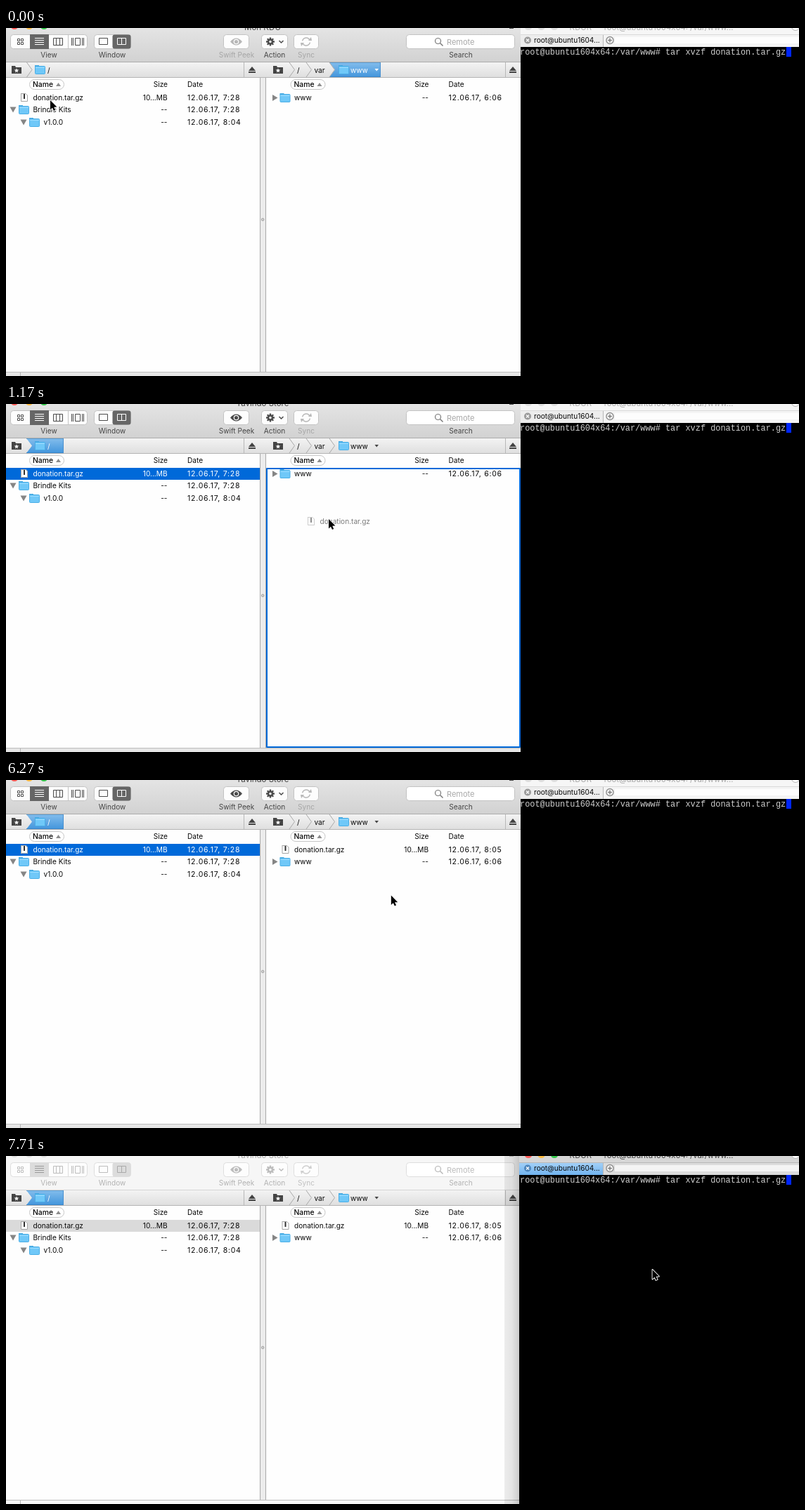
Write an HTML page with a canvas that moves like this. It is 1128 px wide and 496 px high and loops after 8 s.

```html
<!DOCTYPE html>
<html lang="en">
<head>
<meta charset="utf-8">
<title>File transfer</title>
<style>
html, body { margin: 0; width: 100%; height: 100%; overflow: hidden; background: #fff; }
canvas { display: block; }
</style>
</head>
<body>
<canvas id="stage" width="1128" height="496"></canvas>
<script>
const ctx = document.getElementById('stage').getContext('2d');
const LOOP = 8000;
const SANS = 'Inter, "Open Sans", sans-serif';
const MONO = '"Liberation Mono", "DejaVu Sans Mono", monospace';
const BLUE = '#0069d9', GRAY = '#dadada', INK = '#080808';

function rect(x, y, w, h, fill) {
  ctx.fillStyle = fill;
  ctx.fillRect(x, y, w, h);
}
function round(x, y, w, h, r, fill, stroke) {
  ctx.beginPath();
  ctx.roundRect(x + .5, y + .5, w - 1, h - 1, r);
  if (fill) { ctx.fillStyle = fill; ctx.fill(); }
  if (stroke) { ctx.strokeStyle = stroke; ctx.lineWidth = 1; ctx.stroke(); }
}
function trace(pts) {
  ctx.beginPath();
  for (let i = 0; i < pts.length; i += 2) ctx.lineTo(pts[i], pts[i + 1]);
}
function poly(pts, fill) {
  trace(pts);
  ctx.closePath();
  ctx.fillStyle = fill;
  ctx.fill();
}
function line(pts, color, width = 1) {
  trace(pts);
  ctx.strokeStyle = color;
  ctx.lineWidth = width;
  ctx.stroke();
}
function disc(x, y, r, fill, stroke, width = 1) {
  ctx.beginPath();
  ctx.arc(x, y, r, 0, 7);
  if (fill) { ctx.fillStyle = fill; ctx.fill(); }
  if (stroke) { ctx.strokeStyle = stroke; ctx.lineWidth = width; ctx.stroke(); }
}
function fade(y0, y1, top, bottom) {
  const g = ctx.createLinearGradient(0, y0, 0, y1);
  g.addColorStop(0, top);
  g.addColorStop(1, bottom);
  return g;
}
function text(s, x, y, color = INK, o = {}) {
  ctx.font = `${o.weight || 400} ${o.size || 10.1}px ${o.font || SANS}`;
  ctx.letterSpacing = (o.gap || 0) + 'px';
  ctx.textAlign = o.align || 'left';
  ctx.fillStyle = color;
  ctx.fillText(s, x, y);
}

function folder(x, y) {
  rect(x, y, 6, 3, '#45a9e2');
  round(x, y + 1, 15, 12, 1, '#70c8f8', '#4aaee6');
  rect(x + 1, y + 3, 13, 1, '#9bdcff');
}
function doc(x, y) {
  poly([x, y, x + 7, y, x + 10, y + 3, x + 10, y + 12, x, y + 12], '#fff');
  line([x + .5, y + .5, x + 7, y + .5, x + 9.5, y + 3, x + 9.5, y + 11.5, x + .5, y + 11.5, x + .5, y], '#a5a5a5');
  rect(x + 4, y + 1, 2, 7, '#333');
}
function eject(x) {
  poly([x - 5, 61, x, 55, x + 5, 61], '#444');
  rect(x - 5, 62, 10, 2, '#444');
}
function favorite(x) {
  poly([x, 54, x + 5, 54, x + 6, 56, x + 14, 56, x + 14, 65, x, 65], '#444');
  const pts = [];
  for (let i = 0; i < 10; i++) {
    const a = i * Math.PI / 5 - Math.PI / 2, r = i % 2 ? 1.5 : 3.5;
    pts.push(x + 7 + r * Math.cos(a), 60.7 + r * Math.sin(a));
  }
  poly(pts, '#fff');
}
function chevron(x) {
  line([x, 49, x + 7.5, 59.5, x, 70], '#a9a9a9');
}
function blueTab(x0, x1) {
  poly([x0, 49, x1, 49, x1, 70, x0, 70, x0 + 8, 59.5], fade(49, 70, '#83bdec', '#4295dc'));
  rect(x0, 49, x1 - x0, 1, '#5c9dd3');
  rect(x0, 69, x1 - x0, 1, '#3d88cb');
  rect(x1 - 1, 49, 1, 21, '#4a90cf');
}
function arrow(x, y) {
  trace([x, y, x, y + 13.5, x + 3, y + 10.8, x + 5, y + 15, x + 7.2, y + 14, x + 5.2, y + 9.8, x + 9.4, y + 9.6]);
  ctx.closePath();
  ctx.lineJoin = 'round';
  ctx.strokeStyle = '#fff';
  ctx.lineWidth = 1.8;
  ctx.stroke();
  ctx.fillStyle = '#000';
  ctx.fill();
}

// Number of picture steps done by time t, out of n spread from t0 to t1.
function steps(t, t0, t1, n) {
  return t < t0 ? 0 : Math.min(n, Math.floor((t - t0) / (t1 - t0) * (n - 1) + 1.04));
}
const ease = u => 1 - Math.pow(1 - u, 1.43);
const mix = (a, b, u) => a + (b - a) * u;

function pointer(t) {
  const legs = [
    [470, 640, 3, 50, 104], [820, 1170, 5, 459, 164],
    [6270, 6710, 6, 846, 166.5], [7450, 7710, 4, 919.5, 162]
  ];
  let x = 63, y = 103;
  for (const [t0, t1, n, toX, toY] of legs) {
    const u = ease(steps(t, t0, t1, n) / n);
    x = mix(x, toX, u);
    y = mix(y, toY, u);
  }
  return [x, y];
}

function toolbar(s) {
  const live = s.live;
  const dark = live ? '#4b4b4b' : '#bdbdbd', dim = live ? '#b8b8b8' : '#cfcfcf';
  const edge = live ? '#c3c3c3' : '#dedede', on = live ? '#666' : '#dcdcdc';
  const label = live ? '#454545' : '#b2b2b2';
  const look = s.look ? dark : dim;
  rect(0, 0, 732, 48, live ? fade(0, 48, '#e4e4e4', '#d2d2d2') : '#f6f6f6');
  rect(0, 48, 732, 1, live ? '#adadad' : '#d4d4d4');
  ['#fc5b57', '#fdbc40', '#34c84a'].forEach((c, i) => disc(12 + 21 * i, -3.5, 5.5, live ? c : '#dedede'));
  text(s.tabs ? 'Tavindo Store' : 'Mon KDU', 365, 2.5, live ? '#444' : '#aaa', { size: 11.5, align: 'center' });
  rect(716, 0, 6, 1, dark);

  const button = (x, w) => round(x, 9, w, 21, 4, '#fdfdfd', edge);
  button(6, 110);
  rect(34, 9, 27, 21, on);
  rect(88, 10, 1, 19, edge);
  for (const x of [16, 21]) for (const y of [15, 20]) round(x, y, 4, 4, 0, null, dark);
  for (let i = 0; i < 4; i++) rect(41, 14 + 3 * i, 13, 1, live ? '#fff' : '#999');
  round(67, 14, 14, 11, 0, null, dark);
  rect(71, 14, 1, 11, dark);
  rect(76, 14, 1, 11, dark);
  round(98, 14, 8, 11, 0, null, dark);
  for (const x of [93, 95, 108, 110]) rect(x, 14, 1, 11, dark);

  button(125, 53);
  round(151, 9, 27, 21, 3, on);
  round(132, 14, 13, 10, 0, null, dark);
  const pane = live ? '#fff' : '#aaa';
  round(158, 14, 13, 10, 0, null, pane);
  rect(164, 14, 1, 10, pane);

  button(309, 37);
  ctx.beginPath();
  ctx.moveTo(319, 19.5);
  ctx.quadraticCurveTo(327.5, 9.5, 336, 19.5);
  ctx.quadraticCurveTo(327.5, 29.5, 319, 19.5);
  ctx.fillStyle = look;
  ctx.fill();
  disc(327.5, 19.5, 3.2, look, '#fff', 1.2);

  button(363, 38);
  for (let i = 0; i < 4; i++) {
    const a = i * Math.PI / 4, c = 6 * Math.cos(a), d = 6 * Math.sin(a);
    line([376 - c, 19.5 - d, 376 + c, 19.5 + d], dark, 2.4);
  }
  disc(376, 19.5, 4.3, dark);
  disc(376, 19.5, 1.7, '#fff');
  line([388.5, 18, 391.5, 21, 394.5, 18], dark, 1.5);

  button(409, 36);
  ctx.strokeStyle = dim;
  ctx.lineWidth = 1.5;
  for (const a of [.2, Math.PI + .2]) {
    ctx.beginPath();
    ctx.arc(427, 19.5, 5.5, a, a + 2.4);
    ctx.stroke();
  }
  poly([430, 18, 435, 18, 434, 13], dim);
  poly([424, 21, 419, 21, 420, 26], dim);

  round(569, 9, 155, 21, 4, '#fff', edge);
  const lens = live ? '#777' : '#b5b5b5';
  disc(614.5, 18.5, 4, null, lens, 1.2);
  line([617.5, 21.5, 621.5, 25.5], lens, 1.5);
  text('Remote', 627, 23.5, live ? '#a8a8a8' : '#bcbcbc', { size: 11 });

  const labels = [['View', 61], ['Window', 151], ['Swift Peek', 328, !s.look],
    ['Action', 382], ['Sync', 427, true], ['Search', 647]];
  for (const [name, x, off] of labels)
    text(name, x, 41.5, off ? (live ? '#a6a6a6' : '#c0c0c0') : label, { align: 'center' });
}

function pathBars(s) {
  rect(0, 49, 732, 21, fade(49, 70, '#f3f3f3', '#dfdfdf'));
  rect(0, 70, 732, 1, '#b5b5b5');
  if (s.tabs) blueTab(29, 82); else blueTab(460, 533);
  favorite(8);
  favorite(380);
  if (!s.tabs) chevron(29.5);
  folder(41, 53);
  text('/', 59, 63.5, s.tabs ? '#fff' : INK);
  [403, 427, 460].forEach(chevron);
  text('/', 414, 63.5);
  text('var', 438.5, 63.5);
  folder(473, 53);
  text('www', 490, 63.5, s.tabs ? INK : '#fff');
  poly([524.5, 58, 530, 58, 527.2, 61.5], s.tabs ? '#444' : '#fff');
  for (const x of [338, 710]) rect(x, 49, 1, 21, '#b8b8b8');
  eject(350);
  eject(721);
}

function header(x) {
  round(x + 33, 73, 50, 15, 7, '#fff', '#c6c6c6');
  text('Name', x + 38, 84, INK, { weight: 500, size: 10.4 });
  poly([x + 71, 83, x + 78, 83, x + 74.5, 78], '#8d8d8d');
  text('Size', x + 230, 84, INK, { align: 'right' });
  text('Date', x + 258, 84);
}

// item: kind, name, size, date, and the direction of its triangle if any
function row(x, i, indent, item, paint) {
  const [kind, name, size, date, turn] = item;
  const y = Math.round(99 + 17.4 * i), ink = paint === BLUE ? '#fff' : INK;
  if (paint) rect(x, y - 8, 361 - x, 17, paint);
  const tri = paint === BLUE ? '#fff' : '#858585', ax = x + 10 + indent;
  if (turn === 'down') poly([ax - 4.5, y - 3.5, ax + 4.5, y - 3.5, ax, y + 4.5], tri);
  if (turn === 'right') poly([ax - 2.5, y - 4, ax + 5, y + .5, ax - 2.5, y + 5], tri);
  if (kind === 'doc') doc(x + 21, y - 6); else folder(x + 18 + indent, y - 6);
  text(name, x + 38.5 + indent, y + 4, ink);
  text(size, x + 229.5, y + 4, ink, { align: 'right' });
  text(date, x + 258, y + 4, ink, { size: 10.5, gap: .75 });
}

function panes(s) {
  rect(0, 71, 732, 425, '#fefefe');
  header(0);
  header(371.5);
  row(0, 0, 0, ['doc', 'donation.tar.gz', '10...MB', '12.06.17, 7:28'], s.source);
  row(0, 1, 0, ['folder', 'Brindle Kits', '--', '12.06.17, 7:28', 'down'], s.drop === 1 && BLUE);
  row(0, 2, 15, ['folder', 'v1.0.0', '--', '12.06.17, 8:04', 'down'], s.drop === 2 && BLUE);
  if (s.copied) row(371.5, 0, 0, ['doc', 'donation.tar.gz', '10...MB', '12.06.17, 8:05']);
  row(371.5, s.copied ? 1 : 0, 0, ['folder', 'www', '--', '12.06.17, 6:06', 'right']);

  rect(361, 49, 9, 441, '#ececec');
  rect(361, 49, 1, 441, '#a9a9a9');
  rect(369, 49, 1, 441, '#a9a9a9');
  disc(365.2, 273, 1.8, '#d0d0d0', '#999', .8);

  rect(0, 490, 732, 6, s.live ? '#e6e6e6' : '#f6f6f6');
  rect(0, 490, 732, 1, '#bdbdbd');
  if (s.t < 2600 || s.copied) rect(20, 491, 1, 5, '#b5b5b5');
  if (s.t >= 1880 && !s.copied) disc(520, 497, 4.5, null, '#777', 2);
  if (s.t >= 2420 && s.t < 2600) rect(30, 494, 8, 2, '#999');
  if (s.t >= 2600 && !s.copied) {
    round(20, 494, 15, 5, 1, '#999', '#666');
    rect(40, 491, 1, 5, '#bbb');
    if (s.t < 5470) {
      rect(50, 493, 7, 3, '#fff');
      rect(50, 493, 1, 3, '#999');
      rect(53, 493, 2, 3, '#333');
    }
  }
  if (s.drop === 3) {
    ctx.strokeStyle = BLUE;
    ctx.lineWidth = 2;
    ctx.strokeRect(371, 92, 360, 397);
  }
}

function terminal(front) {
  const x = front ? 730 : 732;
  if (front) {
    const g = ctx.createLinearGradient(709, 0, 730, 0);
    g.addColorStop(0, 'rgba(0,0,0,.07)');
    g.addColorStop(.5, 'rgba(0,0,0,.1)');
    g.addColorStop(1, 'rgba(0,0,0,.2)');
    rect(709, 0, 21, 496, g);
  }
  rect(x, 0, 400, 9, front ? '#d6d6d6' : '#f6f6f6');
  const lights = front ? ['#fc5b57', '#fdbc40', '#34c84a'] : ['#dedede', '#dedede', '#dedede'];
  lights.forEach((c, i) => disc(743 + 18.5 * i, -2.5, 5.5, c));
  text('KDUR — root@ubuntu1604x64: /var/www...', 918, 3, front ? '#444' : '#aaa', { size: 11.3, align: 'center' });
  disc(1123, -2, 5.5, '#fff', '#b5b5b5');
  rect(x, 9, 400, 18, front ? '#dcdcdc' : '#f4f4f4');
  rect(x, 9, 400, 1, front ? '#b8b8b8' : '#dadada');
  rect(866, 13, 262, 9, front ? '#f4f4f4' : '#fdfdfd');
  rect(x, 10, 850 - x, 17, front ? fade(10, 27, '#a3d0f7', '#70b3ef') : '#ededed');
  rect(849, 10, 1, 17, '#b8b8b8');
  disc(742, 17.5, 5, front ? '#4d86bd' : '#9b9b9b');
  line([740, 15.5, 744, 19.5], '#fff', 1.2);
  line([744, 15.5, 740, 19.5], '#fff', 1.2);
  text('root@ubuntu1604...', 751, 21, INK);
  disc(859, 17.5, 5, '#fff', '#8c8c8c', 1.4);
  line([856, 17.5, 862, 17.5], '#777', 1.4);
  line([859, 14.5, 859, 20.5], '#777', 1.4);
  rect(x, 27, 400, 469, '#000');
  text('root@ubuntu1604x64:/var/www# tar xvzf donation.tar.gz', 731, 38, '#cfcfcf', { size: 11.9, font: MONO });
  rect(1110, 27, 7, 14, '#0026ff');
}

function ghost(t) {
  const k = steps(t, 820, 1170, 5);
  if (!k || t >= 1790) return;
  const u = ease((k < 5 ? k - .75 : k) / 5), dx = 408 * u, dy = 68 * u;
  ctx.globalAlpha = .55;
  doc(21 + dx, 93 + dy);
  text('donation.tar.gz', 38.5 + dx, 103 + dy, '#111');
  ctx.globalAlpha = 1;
}

function draw(t) {
  const drag = t < 1790 ? steps(t, 820, 1170, 5) : 0;
  const drop = [0, 1, 2, 2, 3, 3][drag];
  const s = {
    t, drop,
    live: t < 7150,
    tabs: t >= 190,
    look: t >= 470,
    copied: t >= 6270,
    source: t < 90 ? null : t >= 7240 || drop === 1 || drop === 2 ? GRAY : BLUE
  };
  if (s.live) terminal(false);
  panes(s);
  pathBars(s);
  toolbar(s);
  if (!s.live) terminal(true);
  ghost(t);
  arrow(...pointer(t));
}

const start = performance.now();
function tick(now) {
  draw(Math.max(0, now - start) % LOOP);
  requestAnimationFrame(tick);
}
draw(0);
requestAnimationFrame(tick);
</script>
</body>
</html>
```
